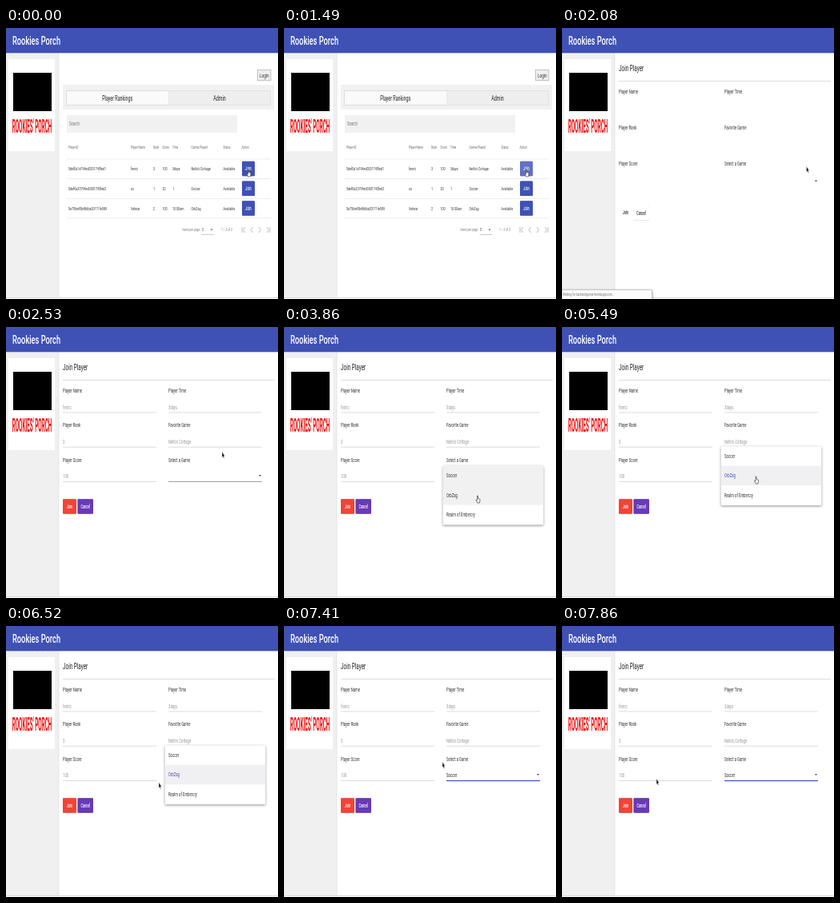
Recreate the animation shown at these times as an HTML page. Size 340x339 px, loop 8 s.

```html
<!DOCTYPE html>
<html lang="en">
<head>
<meta charset="utf-8">
<title>Rookies Porch</title>
<style>
  html, body { margin: 0; width: 100%; height: 100%; overflow: hidden; background: #fff; }
  svg { display: block; width: 100%; height: 100%; font-family: Roboto, Arial, sans-serif; }
  .raised { filter: drop-shadow(0 .8px .7px rgba(0,0,0,.4)); }
  .menu { filter: drop-shadow(0 1px 1.5px rgba(0,0,0,.45)); }
</style>
</head>
<body>
<svg id="stage" viewBox="0 0 340 339" preserveAspectRatio="none"></svg>
<script>
const LOOP = 8000;
const SQUEEZE = 0.6; // the page is shown narrower than it was laid out
const INDIGO = '#3f51b5';
const GAMES = ['Soccer', 'OrbZag', 'Realm of Embercry'];
const stage = document.getElementById('stage');

const rect = (x, y, w, h, fill, extra = '') =>
  `<rect x="${x}" y="${y}" width="${w}" height="${h}" fill="${fill}" ${extra}/>`;
const path = (d, fill, extra = '') => `<path d="${d}" fill="${fill}" ${extra}/>`;
const text = (x, y, str, size = 7, fill = '#333', extra = '', squeeze = SQUEEZE) =>
  `<text transform="translate(${x} ${y}) scale(${squeeze} 1)" font-size="${size}" fill="${fill}" ${extra}>${str}</text>`;
const arrowDown = (x, y, fill = '#666') => path(`M${x - 1.5} ${y}h3l-1.5 2z`, fill);

function button(x, y, w, label, fill, ink = '#fff') {
  return rect(x, y, w, 18.5, fill, 'rx="1.2" class="raised"') +
    text(x + w / 2, y + 11.6, label, 6.3, ink, 'font-weight="500" text-anchor="middle"');
}

function shell() {
  return rect(0, 0, 340, 339, '#fff') +
    rect(0, 31, 66, 306.5, '#f0f0f0') +
    rect(65.6, 31, .7, 306.5, '#dcdcdc') +
    rect(0, 337, 340, 1, '#dadada') +
    rect(0, 0, 340, 31.3, INDIGO) +
    text(8, 20.5, 'Rookies Porch', 15.5, '#fff', 'font-weight="500"') +
    rect(3, 39, 58, 115, '#fff') +
    rect(9, 56, 48, 48, '#000') +
    text(32.5, 131, "ROOKIES' PORCH", 24, '#f00d0d', 'font-weight="700" text-anchor="middle"', .262);
}

function rankings(pressed) {
  const columns = [78, 156, 184, 195.5, 208, 231.5, 271.5, 294.5];
  const heads = ['Player ID', 'Player Name', 'Rank', 'Score', 'Time', 'Games Played', 'Status', 'Action'];
  const rows = [
    ['5def0a1e794ed0001745fed1', 'fenric', 3, 100, '3days', "Nello's Cottage", 'Available'],
    ['5def0a33794ed0001745fed2', 'zu', 1, 20, 1, 'Soccer', 'Available'],
    ['5e756e45b48dba00171fe589', 'Velmar', 2, 100, '10.00am', 'OrbZag', 'Available']
  ];
  let out = rect(314.5, 52.5, 16.5, 13, '#efefef', 'stroke="#aaa" stroke-width=".7"') +
    text(322.8, 61.8, 'Login', 8, '#333', 'text-anchor="middle"') +
    rect(71, 71, 264, 31, '#f1f1f1') +
    rect(203, 78.5, 127.5, 18, '#eee', 'stroke="#ddd" stroke-width=".7"') +
    rect(75.5, 78.5, 127.5, 18, '#fafafa', 'class="raised"') +
    text(139.3, 90.5, 'Player Rankings', 9, '#222', 'text-anchor="middle"') +
    text(267, 90.5, 'Admin', 9, '#222', 'text-anchor="middle"') +
    rect(76, 109, 213, 22, '#f1f1f1', 'rx="1"') +
    text(79, 122.3, 'Search', 7, '#777') +
    heads.map((h, i) => text(columns[i], 151, h, 5.3, '#666')).join('');
  rows.forEach((row, r) => {
    const y = 176 + r * 24.7;
    out += rect(76, y - 12.3, 255, .6, '#e2e2e2') +
      row.map((cell, i) => text(columns[i], y + 2.2, cell, 6.1)).join('') +
      button(295, y - 9.2, 16, 'Join', pressed && r === 0 ? '#6271c4' : INDIGO);
  });
  const icons = 'M295 249v7M299 249l-2.5 3.5 2.5 3.5M308.5 249l-2.5 3.5 2.5 3.5' +
    'M316 249l2.5 3.5-2.5 3.5M326 249l2.5 3.5-2.5 3.5M330 249v7';
  return out + rect(76, 237.6, 255, .6, '#e2e2e2') +
    text(220.5, 254.2, 'Items per page:', 5.4, '#777') +
    text(245, 254.2, '5', 5.6) +
    arrowDown(257, 251.5) +
    rect(244.5, 258, 15.5, .6, '#aaa') +
    text(269, 254.2, '1 – 3 of 3', 5.4, '#777') +
    path(icons, 'none', 'stroke="#aaa" stroke-width=".8"');
}

function form({ loaded, game, focused }) {
  const labels = [['Player Name', 'Player Time'], ['Player Rank', 'Favorite Game'], ['Player Score', 'Select a Game']];
  const values = [['fenric', '3days'], ['3', "Nello's Cottage"], ['100', '']];
  let out = text(71, 53.5, 'Join Player', 10.6, '#222') + rect(71, 66, 265, .8, '#d5d5d5');
  labels.forEach((pair, r) => pair.forEach((label, c) => {
    const x = c ? 203 : 71;
    out += text(x, 82 + r * (loaded ? 43.4 : 45.2), label, 7.1);
    if (!loaded) return;
    const isSelect = r === 2 && c === 1;
    const lineColor = isSelect ? (focused ? INDIGO : '#777') : '#ccc';
    out += text(x, 102.5 + r * 43.2, values[r][c], 7.1, '#999') +
      rect(x, 106.6 + r * 43.2, 117, isSelect && focused ? 1.2 : .7, lineColor);
  }));
  if (!loaded) {
    return out + arrowDown(317.5, 190.5, '#333') +
      text(79.5, 233.4, 'Join', 6.3, '#333', 'font-weight="500" text-anchor="middle"') +
      button(89, 222, 20, 'Cancel', '#fff', '#333');
  }
  return out + text(203, 188.7, game, 7.1, '#222') +
    arrowDown(317.5, 185, '#444') +
    button(71, 215.2, 17, 'Join', '#f44336') +
    button(89.5, 215.2, 19.5, 'Cancel', '#673ab7');
}

function menu({ top, opacity, hover, game }) {
  const items = GAMES.map((name, i) => {
    const y = top + 24.5 * i;
    const chosen = name === game;
    const lit = chosen || hover === i || (!game && i === 0);
    return (lit ? rect(198.7, y, 125.6, 24.6, chosen ? '#f0f0f3' : '#f1f1f1') : '') +
      text(203, y + 14.7, name, 7.1, chosen ? INDIGO : '#333');
  });
  return `<g opacity="${opacity}">` +
    rect(198.7, top, 125.6, 74, '#fff', 'rx="1.2" class="menu"') + items.join('') + '</g>';
}

function statusBar() {
  return rect(-2, 327.5, 114.5, 14, '#fafafa', 'rx="1.5" stroke="#bbb" stroke-width=".7" class="menu"') +
    text(1, 335, 'Waiting for backendgamer.herokuapp.com...', 5.5, '#777');
}

function pointer(x, y, hand) {
  const shape = hand
    ? path('M.6 0Q1.2-.5 1.5.5V3.4L3.7 4.2Q4.2 4.5 4 6L3.4 9H.7L-1 5.7Q-1 4.7.5 5.7Z', '#fff', 'stroke="#222" stroke-width=".6"')
    : path('M0 0V7L1.1 5.9 2 8.2 2.9 7.7 2 5.5H3.5Z', '#111', 'stroke="#fff" stroke-width=".4"');
  return `<g transform="translate(${x} ${y})">${shape}</g>`;
}

// Each step holds until the next: time, pointer x, pointer y, hand pointer, changes to the page.
const first = { top: 173.5, opacity: 1, hover: 0 };
const second = { top: 149.2, opacity: 1, hover: 1 };
const steps = [
  [0, 302, 177, 1, { page: 'rankings', game: '' }],
  [1350, 302, 177, 1, { pressed: true }],
  [1500, 305.5, 173, 0, { page: 'form', status: true }],
  [2380, 305.5, 173, 0, { loaded: true }],
  [2530, 270, 156, 0, { status: false }],
  [2680, 256, 172, 0],
  [2820, 243, 184, 1],
  [3120, 243, 184, 1, { focused: true, menu: { ...first, opacity: .6 } }],
  [3270, 243, 184, 1, { menu: first }],
  [3560, 242, 193, 1],
  [3710, 241.5, 204, 1, { menu: { ...first, hover: 1 } }],
  [3860, 241, 211, 1],
  [4310, 241, 208, 1],
  [4450, 241.5, 202, 1, { game: 'OrbZag', menu: { ...first, hover: 1, opacity: .5 } }],
  [4600, 241.5, 199, 1, { menu: null }],
  [4750, 241.5, 192, 1],
  [4890, 241.5, 187, 1],
  [5190, 241.5, 187, 1, { menu: { ...second, opacity: .6 } }],
  [5340, 241.5, 187, 1, { menu: second }],
  [5630, 238, 187, 1],
  [5780, 233, 189, 1],
  [5920, 228, 191, 1],
  [6220, 214, 194, 1],
  [6370, 200, 195, 1],
  [6520, 191, 195.5, 0],
  [6810, 203, 180, 1],
  [6960, 210, 163, 1, { menu: { ...second, hover: 0 } }],
  [7260, 210, 162, 1, { game: 'Soccer', menu: { ...second, hover: 0, opacity: .5 } }],
  [7410, 198, 170, 0, { menu: null }],
  [7560, 150, 184, 0],
  [7710, 118, 189, 0],
  [7860, 118, 191, 0]
];

let shown = -1;
function draw(time) {
  let index = steps.length - 1;
  while (steps[index][0] > time) index--;
  if (index === shown) return;
  shown = index;
  const state = Object.assign({}, ...steps.slice(0, index + 1).map(step => step[4]));
  const [, x, y, hand] = steps[index];
  stage.innerHTML = shell() +
    (state.page === 'form' ? form(state) : rankings(state.pressed)) +
    (state.menu ? menu({ ...state.menu, game: state.game }) : '') +
    (state.status ? statusBar() : '') +
    pointer(x, y, hand);
}

const start = performance.now();
function tick() {
  draw((performance.now() - start) % LOOP);
  requestAnimationFrame(tick);
}
tick();
</script>
</body>
</html>
```
